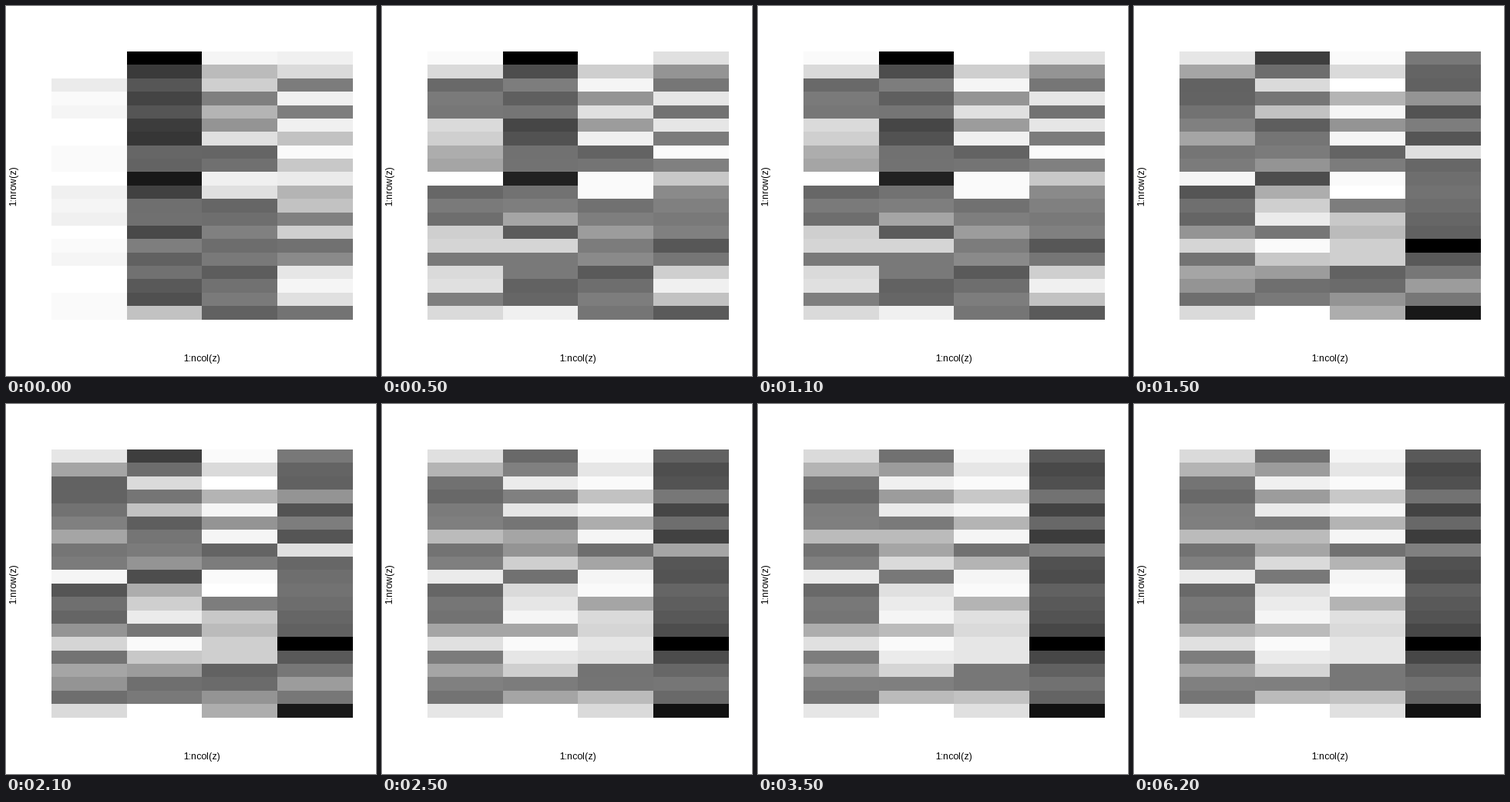
Recreate the animation shown at these times as a matplotlib script. Size 480 px wide and 480 px high, loop 8 s.

```python
import numpy as np
import matplotlib.pyplot as plt
from matplotlib.animation import FuncAnimation
from matplotlib.colors import ListedColormap

plt.rcParams["text.hinting_factor"] = 1  # whole-pixel letter spacing

SIZE, DPI = 480, 72
LEFT, RIGHT, TOP, BOTTOM = 59.04, 449.76, 59.04, 406.56
GAMMA = 2.2

# Settled mix of each row: its first three parts, the fourth is the remainder.
MIX = np.array([
    (7, 38, 1.6), (13, 16, 5), (35, 3, 0.6), (47, 16, 10), (24, 4, 1.6),
    (21, 27, 13), (12, 12, 1.6), (37, 15, 38), (20, 7, 13), (4, 30, 1.6),
    (47, 6, 0.6), (30, 4, 13), (34, 2, 6), (14, 12, 7), (6, 0.5, 4.5),
    (24, 4, 5), (15, 8, 31), (20, 21, 31), (34, 12, 11), (5.4, 0, 6.4),
]) + 0.6
MIX = np.column_stack([MIX, 112 - MIX.sum(axis=1)])
ROWS, COLS = MIX.shape

# How far each step still is from the settled state.
DRIFT = (1, 0.78, 0.4, 0.095, 0)
# The first column starts almost empty, overshoots, then settles.
FIRST_COLUMN = (-1.15, 1.15, 0.8, 0.18, 0)


def shares(step):
    """Row shares: the settled mix, sharpened midway and reweighted per column."""
    drift = DRIFT[step]
    sharpness = 1 + 0.7 * drift * (1 - drift)
    bias = np.array([FIRST_COLUMN[step], 3.95 * drift, 3.07 * drift, 0])
    odds = np.exp(sharpness * np.log(MIX / MIX[:, -1:]) + bias)
    return odds / odds.sum(axis=1, keepdims=True)


def levels(step):
    """Shares stretched over the whole palette."""
    z = shares(step)
    return (z - z.min()) / np.ptp(z) * 99


def grey_ramp(count, start, end):
    return np.linspace(start ** GAMMA, end ** GAMMA, count) ** (1 / GAMMA)


greys = np.concatenate([grey_ramp(20, 1, 0.5), grey_ramp(80, 0.5, 0)])
palette = ListedColormap(np.repeat(greys[:, None], 3, axis=1))

fig = plt.figure(figsize=(SIZE / DPI, SIZE / DPI), dpi=DPI, facecolor="white")
ax = fig.add_axes([0, 0, 1, 1])
ax.set(xlim=(0, SIZE), ylim=(SIZE, 0))
ax.axis("off")

x_edges = np.round(np.linspace(LEFT, RIGHT, COLS + 1))
y_edges = np.round(np.linspace(TOP, BOTTOM, ROWS + 1))
mesh = ax.pcolormesh(x_edges, y_edges, levels(0), cmap=palette, vmin=-0.5,
                     vmax=99.5, antialiased=False, linewidth=0)

label = dict(family="Liberation Sans", size=12, color="black", ha="center",
             va="baseline", rotation_mode="anchor")
ax.text((LEFT + RIGHT) / 2, 461, "1:ncol(z)", **label)
ax.text(13, (TOP + BOTTOM) / 2, "1:nrow(z)", rotation=90, **label)


def update(tick):
    # Half-second ticks: the first step lasts one, the next three two, the last holds.
    mesh.set_array(levels(min((tick + 1) // 2, len(DRIFT) - 1)))
    return [mesh]


anim = FuncAnimation(fig, update, frames=16, interval=500, repeat=True,
                     repeat_delay=0, blit=False)
plt.show()
```
